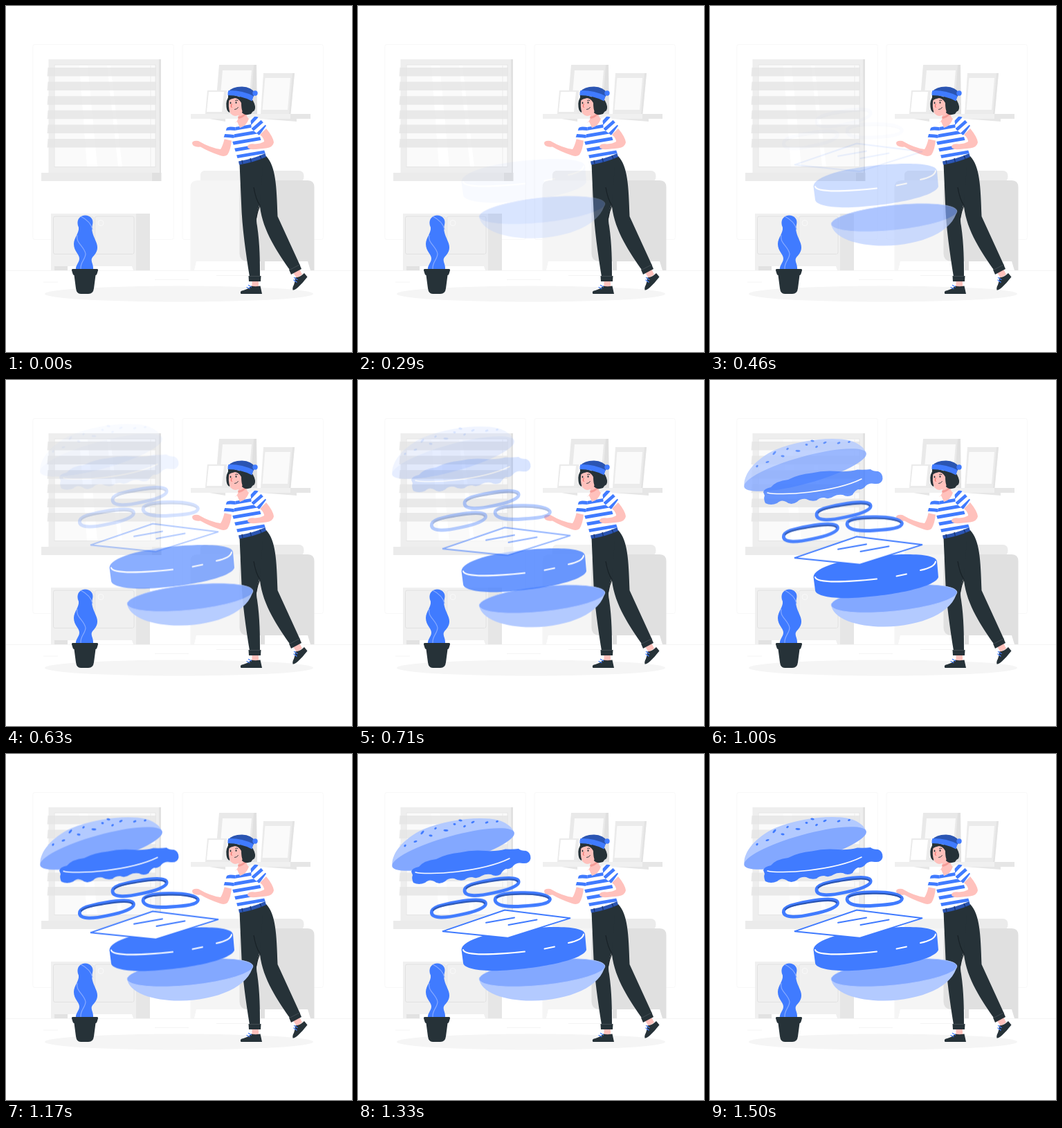
Recreate the animation shown at these times as an HTML page. Size 500 px wide and 500 px high, loop 1.54 s.

```html
<!DOCTYPE html>
<html lang="en">
<head>
<meta charset="utf-8">
<title>Burger layers</title>
<style>
  html, body { margin: 0; width: 100%; height: 100%; overflow: hidden; background: #fff; }
  svg { display: block; width: 100vw; height: 100vh; }
  .blue { fill: #407bff; }
  .mid { fill: #83a8ff; }
  .pale { fill: #b3caff; }
  .navy { fill: #2b55b2; }
  .dark { fill: #263238; }
  .skin { fill: #ffc1bc; }
  .line { fill: none; stroke: #fff; stroke-width: 2; stroke-linecap: round; }
  .stripe { fill: none; stroke: #407bff; stroke-width: 4.8; }
  .ring { fill: none; stroke: #407bff; stroke-width: 4.8; }
  .wall { fill: none; stroke: #2b55b2; stroke-width: 2.2; }
  .layer { opacity: 0; }
</style>
</head>
<body>
<svg viewBox="0 0 500 500">
  <defs>
    <clipPath id="body"><path d="M329 170 334 167 338 176Q347 174 351 163L357 160 366 186 375 214 336 225 327 195Z"/></clipPath>
    <clipPath id="sleeveL"><path d="M319 176Q324 173 332 174L328 195 314 192Z"/></clipPath>
    <clipPath id="sleeveR"><path d="M353 162Q360 158 365 161L376 173 366 187 355 178Z"/></clipPath>
    <g id="onion">
      <path class="ring" d="M154 197C153 189 170 185 190 181.500C210 178 231 176.500 232 183C234 190 215 196 195 200C175 204.500 155 206 154 197Z"/>
      <path class="wall" d="M156 194C160 188 175 186 190 183.500C210 180 228 179 231 184"/>
    </g>
  </defs>

  <!-- room -->
  <g fill="none" stroke="#f8f8f8">
    <rect x="38.800" y="55.500" width="203.500" height="282" rx="3"/>
    <rect x="255" y="55.500" width="203.500" height="282" rx="3"/>
    <path d="M0 382.400H500M54 399H75M215 395.500H264M304 389.500H350" stroke="#f4f4f4"/>
  </g>

  <!-- window -->
  <path d="M61.500 77H224V241H61.500Z" fill="#eee"/>
  <path d="M221 77H224V241H222Z" fill="#e1e1e1"/>
  <path d="M70 85H216V232.500H70Z" fill="#fafafa" stroke="#e3e3e3" stroke-width=".8"/>
  <path d="M106 86H118L132 232H117ZM146 86H151L168 232H162Z" fill="#fff"/>
  <path d="M209 86V232" stroke="#ececec"/>
  <path id="slats" fill="#e6e6e6" opacity=".82"/>
  <path d="M51 241H224V253H51Z" fill="#ebebeb"/>
  <path d="M211 241H224.500V253H211Z" fill="#e0e0e0"/>

  <!-- cabinet -->
  <path d="M65 300H188V382H65Z" fill="#f0f0f0"/>
  <path d="M188 300H208V382H188Z" fill="#e6e6e6"/>
  <path d="M70 376H89V382H70Z" fill="#e2e2e2"/>
  <path d="M89 376H182L184 382H89Z" fill="#fff"/>
  <g fill="#f0f0f0" stroke="#e0e0e0" stroke-width=".9">
    <rect x="68.500" y="304" width="57.500" height="54.500" rx="2.500"/>
    <rect x="128.500" y="304" width="56.500" height="54.500" rx="2.500"/>
  </g>
  <circle cx="137" cy="313.500" r="4" fill="none" stroke="#fafafa"/>

  <!-- shelf -->
  <path d="M267 156H440V163H267Z" fill="#f0f0f0"/>
  <path d="M411 156H440V163H411Z" fill="#e6e6e6"/>
  <path d="M294 163H317V167ZM369 163H420V167Z" fill="#e6e6e6"/>
  <path d="M308 85H361.500L362.500 156H302Z" fill="#e9e9e9"/>
  <path d="M358 85H362L363 156H353Z" fill="#e0e0e0"/>
  <path d="M313 93H355L350 150H308Z" fill="#fafafa"/>
  <path d="M291 122H319L317 156H288Z" fill="#ebebeb"/>
  <path d="M293 124H315L312 153H290Z" fill="#fff"/>
  <path d="M372 97H417L411 156H368Z" fill="#ebebeb"/>
  <path d="M414 97H417L411.500 156H409Z" fill="#e3e3e3"/>
  <path d="M374.500 104H411L407 150H370.500Z" fill="#fafafa"/>

  <!-- sofa -->
  <rect x="281" y="238" width="149.500" height="16" rx="7" fill="#ebebeb"/>
  <path d="M281 245Q281 238 288 238H340V254H281Z" fill="#f1f1f1"/>
  <path d="M266.500 382V262Q266.500 252 277 252H350V369H275L272 382Z" fill="#f5f5f5"/>
  <path d="M337.500 262Q338 252 348 252H436Q445.500 252 445.500 262V382H440L436 369H374V382H368V369H348Q337.500 368 337.500 358Z" fill="#e0e0e0"/>

  <ellipse cx="250" cy="416" rx="194" ry="11.500" fill="#f5f5f5"/>

  <!-- plant -->
  <path class="blue" d="M114 302.500C123 302.500 127 309 125 316C122 326 128 334 131 343C134 352 130 358 125 363C121 368 127 373 126 381H101C100 375 106 371 106 365C106 359 98 354 98 344C98 335 106 328 105 320C101 311 105 303 114 302.500Z"/>
  <path d="M108 304C116 308 123 314 125 323M103 331C100 342 113 347 115 358C115 366 107 370 108 380" fill="none" stroke="#86aaff" stroke-width="1.200"/>
  <path class="dark" d="M96.500 380H131.500Q133.500 380 133 382L131.500 387Q131 389 129.500 389L127 408Q126 416 119 416H108Q102 416 101 408L98.500 389Q97 389 96.500 387L95 382Q94.500 380 96.500 380Z"/>

  <!-- woman -->
  <path class="skin" d="M355.500 396H365V406H355.500ZM414 384 424 380 428 388 420 393Z"/>
  <path class="dark" d="M339 415Q338 411.500 343 411Q350 409 354.500 404.500Q360 406 367.500 404.500L370 416H339.500Z"/>
  <path class="dark" d="M414.500 410.500Q413.500 407 416 403Q418 398 418 392.500Q425 392 431 386L435.500 391.500Q429 400 422 406.500Q417 411 414.500 410.500Z"/>
  <path d="M348 406.500 352 408.500M350.500 403.500 354.500 406M416 396 420 399M416.500 392.500 421 395.500" stroke="#407bff" stroke-width="1.300" stroke-linecap="round"/>
  <path class="dark" d="M352 226 376 217C390 232 391 260 392.500 304L425 375 411 382.500C393 357 371 325 367 290L360 262Z"/>
  <path class="dark" d="M337.500 228 372 219 367 285C362 300 361 308 363 318C367 345 367 370 367 391H352C347 360 341 320 340 285Z"/>
  <path d="M358 262Q361 280 367 288Q363 297 361.500 307" fill="none" stroke="#182126" stroke-width="1.200"/>
  <path class="dark" d="M350.500 390H368.500L368 398H351ZM409 381 424 373 427 380 412 388Z"/>
  <path d="M351 390.500H368M409.500 381.500 424 374" stroke="#49545a" stroke-width=".8"/>

  <path class="skin" d="M316 191 326 194Q325 207 320 215Q315 218.500 308 215.500Q292 210 281 203.500Q270 204.500 269 198.500Q269 194 278 195Q295 205 310 207Q313 203 316 191Z"/>
  <path class="skin" d="M336 152 347 154Q347 160 352 164Q349 175 338 177L331 169Q336 165 336 159Z"/>
  <path d="M335 160Q342 159 346 154L347 157Q342 162 336 163Z" fill="#f59d98"/>
  <g clip-path="url(#body)">
    <path d="M310 155H385V230H310Z" fill="#fff"/>
    <path id="stripes" class="stripe"/>
  </g>
  <g clip-path="url(#sleeveL)">
    <path d="M310 168H335V198H310Z" fill="#fff"/>
    <path class="stripe" d="M315 178Q324 176 334 178M313 187.500Q322 187 332 189"/>
  </g>
  <g clip-path="url(#sleeveR)">
    <path d="M350 155H380V190H350Z" fill="#fff"/>
    <path class="stripe" d="M351 172 364 158M356 179 372 165M363 186 378 172"/>
  </g>
  <path class="navy" d="M336 224.500Q357 221 374.500 213L376 218Q358 226 337 229.500Z"/>
  <path d="M341 223 342 228M353 220 354.500 226M367 216 369 221" stroke="#1b3672" stroke-width="1.400"/>
  <path class="skin" d="M376 177Q386 189 387 197Q386 204 376 205.500L361 207Q349 208 349 203Q350 198 360 199.500Q368 199 373 196Q373 191 367 186Z"/>

  <path class="dark" d="M338 128Q353 128 357 137Q362 146 359 151Q355 153 354 156Q345 159 341 154Q336 145 338 128Z"/>
  <path class="dark" d="M324 128Q317 136 318.500 146Q319 152 323 154L328 138Z"/>
  <path class="skin" d="M324 131Q320.500 140 322.500 150Q324 158 331 159Q338 158.500 342 152L343 135 330 130Z"/>
  <path class="dark" d="M321 128Q334 128 347 136L349 151 342 153Q340 149 340 140Q337 134 331 133Q325 134 321 137Z"/>
  <path class="navy" d="M321.500 124Q326 116.500 341 116.500Q355 117 360 126L356 134Q341 125 321.500 126Z"/>
  <path class="blue" d="M321.500 122Q341 121.500 357.500 130L355.500 137.500Q340 129 320.500 129Q320 125 321.500 122Z"/>
  <circle class="blue" cx="360" cy="126" r="3.700"/>
  <ellipse class="dark" cx="324.500" cy="140" rx=".9" ry="1.500"/>
  <ellipse class="dark" cx="332.500" cy="139.500" rx=".9" ry="1.500"/>
  <path d="M330.500 149.500Q334 149.500 335.500 146.500M331.500 136.500Q333 135.500 335 136.500" fill="none" stroke="#263238" stroke-width=".9" stroke-linecap="round"/>
  <path d="M326.500 141.500Q324 146 327 146.500" fill="none" stroke="#f0706b" stroke-width="1.200"/>

  <!-- burger, each layer with its delay in ms -->
  <g class="layer" data-delay="0">
    <path class="pale" d="M174.800 323C176 346 215 357 252 356.500C305 356 352 336 357 305Z"/>
    <ellipse class="mid" cx="266" cy="316" rx="91.300" ry="18" transform="rotate(-6 266 316)" stroke="#b3caff" stroke-width=".8"/>
  </g>
  <g class="layer" data-delay="190">
    <path class="blue" d="M149.500 283C150 268 195 256 250 251.500C290 248.500 326 249.500 328 260L330 283C325 298 260 310.500 205 313C180 314 153 311 152 302Z"/>
    <path class="line" d="M152 283C154 291.500 195 290.500 241 285.500M269.500 281.500 284 278.500M304 273C316 270.500 325 266.500 326 260.500"/>
  </g>
  <g class="layer" data-delay="285">
    <path d="M122 256.300 212 225.500 307 237.200 216 265.800Z" fill="#fff" stroke="#407bff" stroke-width="1.900"/>
    <path class="line" style="stroke:#407bff" d="M185 243.700 226 236.500M217.500 247 258.500 239.500"/>
  </g>
  <g class="layer" data-delay="375">
    <use href="#onion"/>
    <use href="#onion" x="-47.700" y="31.500"/>
    <path class="ring" d="M198 210C198 203 215 200 235 199.700C258 199 277 203 277.500 209C277 216 258 218 238 219C218 220.500 199 219 198 210Z"/>
    <path class="wall" d="M200 207C204 203 218 202 235 201.700C255 201 272 204 276 208"/>
  </g>
  <g class="layer" data-delay="470">
    <path class="pale" d="M50 162C46 146 62 122 94 107C125 94 165 89 190 91.500C210 93 224 103 225.500 112L138 150Z"/>
    <ellipse class="mid" cx="137.600" cy="136" rx="91.500" ry="19.500" transform="rotate(-15.500 137.600 136)"/>
    <g id="seeds" class="blue"></g>
  </g>
  <g class="layer" data-delay="470">
    <path class="blue" d="M77 168Q78 163 88 161Q95 152 113 150Q128 142 147 140.500Q165 136 185 138Q201 139 213 135.500Q224 136 232 135Q235 138 243 138Q250 141 249.500 149Q248 157 238 156Q230 154 225 159Q221 165 214 164Q209 166 206 172Q199 176 192 172Q184 171 179 174Q172 179 165 176Q158 176 154 180Q146 182 139 178Q131 177 126 182Q117 188 110 182Q103 178 97 184Q88 188 80 184Q77 178 79 173Z"/>
    <path class="line" style="stroke-width:1.500" d="M83 169C100 173.500 178 169 219 149"/>
  </g>
</svg>
<script>
  const LOOP = 1540, FPS = 24;
  const $ = id => document.getElementById(id);
  const repeat = (n, make) => Array.from({ length: n }, (_, i) => make(i)).join('');

  $('slats').setAttribute('d', repeat(6, i => `M60.500 ${89 + i * 20.6}H217L216 ${101.5 + i * 20.6}H59.500Z`));
  $('stripes').setAttribute('d', repeat(5, i => `M316 ${180 + i * 10.2}L380 ${169 + i * 10.2}`));

  // x, y, length, angle
  const seeds = [
    [68, 130.5, 2, -50], [83, 124.5, 2.6, -15], [93, 111.5, 3.4, -50], [105, 116, 2.6, 5],
    [112, 105.5, 2, -40], [127, 108.5, 3.5, 5], [139.5, 99.5, 2, 10], [148, 94, 2.7, 8],
    [154, 102.5, 2, -30], [166, 96.5, 2.7, -25], [186, 97, 2.5, -20], [201, 95.5, 2, -25]
  ];
  $('seeds').innerHTML = seeds.map(([x, y, r, a]) =>
    `<ellipse rx="${r}" ry="1.400" transform="translate(${x} ${y}) rotate(${a})"/>`).join('');

  const drops = [...document.querySelectorAll('.layer')].map(el => {
    const drop = el.animate([
      { opacity: 0, transform: 'translateY(-30px)' },
      { opacity: 1, transform: 'translateY(0px)' }
    ], {
      duration: 1000, delay: +el.dataset.delay, fill: 'both',
      easing: 'cubic-bezier(.36, -.01, .5, 1.38)'
    });
    drop.pause();
    return drop;
  });

  const start = performance.now();
  function draw() {
    const t = (performance.now() - start) % LOOP;
    const tick = Math.floor((t + 5) * FPS / 1000);   // steps fall on 10 ms marks
    for (const drop of drops) drop.currentTime = tick * 1000 / FPS;
    requestAnimationFrame(draw);
  }
  draw();
</script>
</body>
</html>
```
